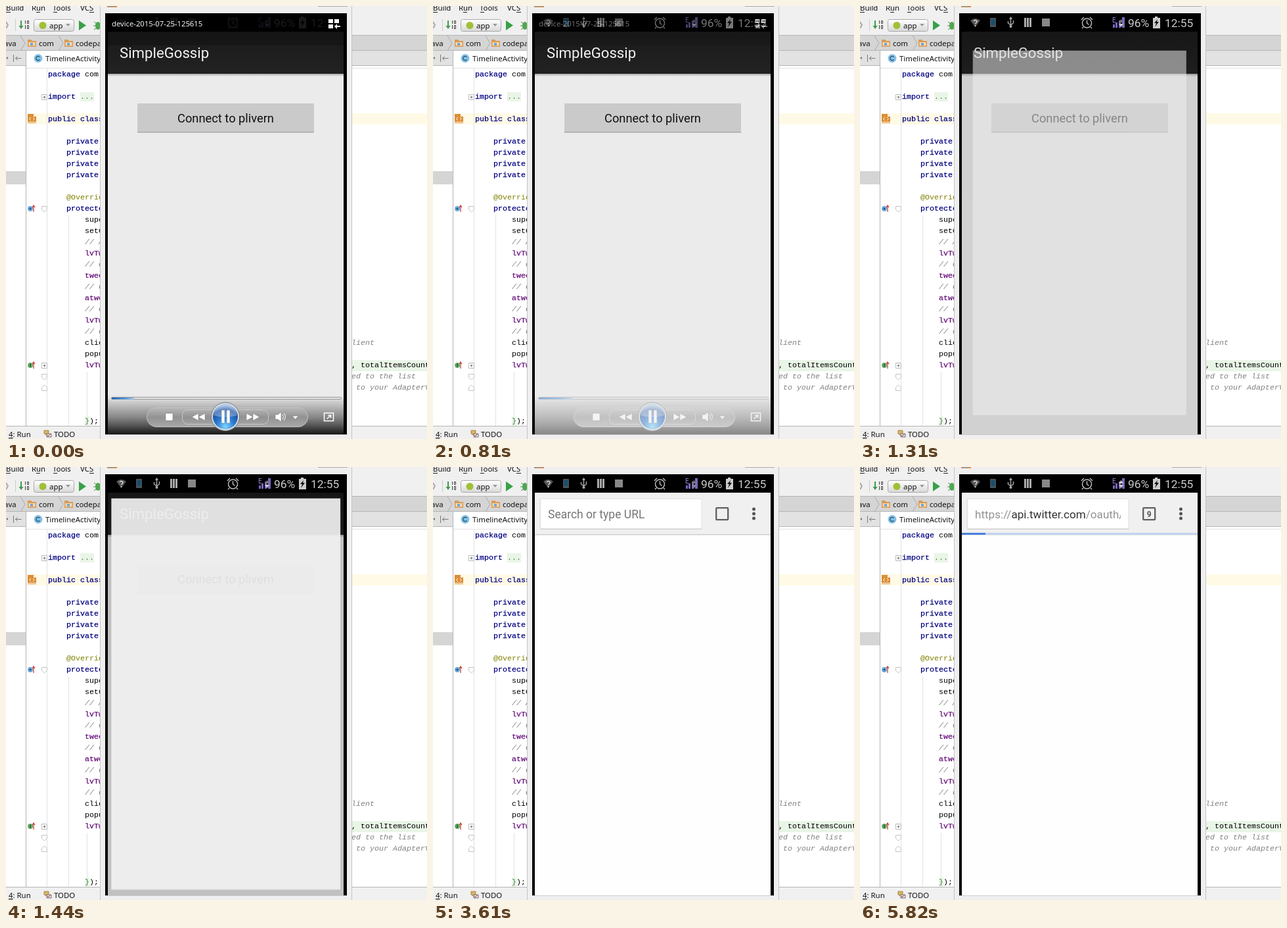
These frames come from a looping animation (641x658 px, 8000 ms). An HTML page:

```html
<!DOCTYPE html>
<html lang="en">
<head>
<meta charset="utf-8">
<title>App sign-in</title>
<style>
html, body { margin: 0; width: 100%; height: 100%; overflow: hidden; background: #fff; }
.stage { position: relative; width: 641px; height: 658px; max-width: 100%; max-height: 100%; overflow: hidden; contain: strict; }
svg, pre { position: absolute; left: 0; top: 0; margin: 0; overflow: hidden; }
svg { width: 641px; height: 658px; }
pre { font: 11.67px/17px "Liberation Mono", monospace; color: #000; }
pre b, pre u { font-weight: normal; text-decoration: none; -webkit-text-stroke: .25px; }
pre b { color: #000080; }
pre u { color: #660e7a; }
pre i { color: #808080; }
pre s { background: #e9f5e6; color: #408040; text-decoration: none; }
.code { left: 64px; top: 96px; width: 80px; }
.tail { left: 526px; top: 504px; width: 115px; }
.ide text { font: 11.4px "Noto Sans", sans-serif; fill: #111; }
.phone text { font-family: Roboto, sans-serif; }
.status text { font-size: 17.4px; fill: #ccc; }

/* Every state change is a hard cut on one shared 8 s clock. */
.player, .seek, .dim, .launch, .bar, .icons, .page, .hint, .url, .up, .down, .sheet, .load, .loaded, .tabs {
  animation: 8s step-end infinite;
}
.player { animation-name: player; }
.seek { animation-name: seek; }
.dim { animation-name: dim; }
.launch { animation-name: launch; transform-origin: 334.5px 345px; }
.bar { animation-name: bar; }
.icons { animation-name: icons; }
.page { animation-name: page; }
.hint { animation-name: hint; }
.url { animation-name: url; }
.up { animation-name: up; }
.down { animation-name: down; }
.sheet { animation-name: sheet; }
.load { animation-name: load; }
.loaded { animation-name: loaded; }
.tabs { animation-name: tabs; }
@keyframes player { 0% { opacity: 1 } 6.5% { opacity: .88 } 8.125% { opacity: .7 } 10.125% { opacity: .47 } 13% { opacity: 0 } }
@keyframes seek { 0% { width: 34px } 3.5% { width: 51px } }
@keyframes dim { 0% { opacity: 0 } 14.75% { opacity: .04 } 16.375% { opacity: .11 } 18% { opacity: .18 } }
@keyframes launch {
  0% { opacity: 0; transform: scale(.8) }
  14.75% { opacity: .14; transform: scale(.83) }
  16.375% { opacity: .53; transform: scale(.905) }
  18% { opacity: .93; transform: scale(.972) }
  19.625% { opacity: 1; transform: none }
}
@keyframes bar { 0% { opacity: 0 } 19.625% { opacity: .11 } 30.75% { opacity: 1 } }
@keyframes icons { 0% { opacity: 0 } 28.5% { opacity: .13 } 30.75% { opacity: 1 } }
@keyframes page { 0% { fill: #f0f0f0 } 30.75% { fill: #fefefe } }
@keyframes hint { 0% { opacity: 1 } 57.625% { opacity: 0 } }
@keyframes url { 0% { opacity: 0 } 57.625% { opacity: 1 } }
@keyframes up { 0% { fill: #777 } 32.625% { fill: #ccc } 45.125% { fill: #777 } 57.625% { fill: #ccc } }
@keyframes down { 0% { fill: #ccc } 32.625% { fill: #888 } 57.625% { fill: #ccc } }
@keyframes sheet { 0% { opacity: 0 } 61.375% { opacity: 1 } 63.25% { opacity: 0 } }
@keyframes load { 0% { opacity: 0 } 67.375% { opacity: 1 } }
@keyframes loaded { 0% { width: 0 } 67.375% { width: 18px } 69.125% { width: 36px } }
@keyframes tabs { 0% { opacity: 0 } 72.75% { opacity: 1 } }
</style>
</head>
<body>
<div class="stage">
<svg class="ide" viewBox="0 0 641 658">
  <defs>
    <linearGradient id="button" x2="0" y2="1"><stop stop-color="#fff"/><stop offset="1" stop-color="#d8d8d8"/></linearGradient>
    <g id="folder"><path d="M0 1h5l2 2h6v9H0z" fill="#d99a56"/><path d="M1.500 5h10v5.500h-10z" fill="#f6d8ac"/><path d="M4 6h4v4H4z" fill="#6da7d6"/></g>
    <path id="chevron" d="M0 0 7 11.500 0 23" fill="none" stroke="#aaa"/>
    <g id="plus" fill="#fff" stroke="#bbb"><path d="M.5.500h8v8h-8z"/><path d="M2.500 4.500h4M4.500 2.500v4" stroke="#777"/></g>
    <path id="fold" d="M.5.500h8v5l-4 3.500-4-3.500z" fill="#fff" stroke="#c4c4c4"/>
    <path id="override" d="M42 313v-10m-2 3 2-3 2 3" fill="none" stroke="#c8453c" stroke-width="1.300"/>
  </defs>
  <path fill="#f0f0f0" d="M0 0h641v45H0zM0 639h641v19H0z"/>
  <path fill="#e2e2e2" d="M0 68h641v22H0z"/>
  <path fill="#d5d5d5" d="M0 45h641v22H0zM0 251h30v20H0z"/>
  <path fill="#fffae6" d="M31 163h610v17H31z"/>
  <path fill="#e9f5e6" d="M527 538h114v17H527z"/>
  <path fill="none" stroke="#b5b5b5" d="M0 44.500h641M0 67.500h641M0 90.500h641M30.500 68v570M0 638.500h641"/>
  <path fill="none" stroke="#e2e2e2" d="M31 94.500h610M62.500 95v543M95.500 318v320M123.500 556v68"/>

  <text y="7">
    <tspan x="0">Build</tspan><tspan x="39">Run</tspan><tspan x="71">Tools</tspan><tspan x="113">VCS</tspan>
  </text>
  <path fill="none" stroke="#222" d="M0 9.500h7M46 9.500h6M72 9.500h6M127 9.500h7"/>

  <path d="m0 24 3 5-3 5" fill="none" stroke="#aaa" stroke-width="2"/>
  <path d="M14.500 20v18" stroke="#ccc"/>
  <path d="M22 22h2v8h2.500L23 35l-3.500-5H22z" fill="#3d9b4b"/>
  <path d="M29 22h1v5h-1zm0 7h1v6h-1z" fill="#444"/>
  <path d="M32.500 22.500h2v4h-2zm0 7h2v5h-2z" fill="none" stroke="#444"/>
  <rect x="42.500" y="20.500" width="61" height="18" rx="3" fill="url(#button)" stroke="#aaa"/>
  <circle cx="56" cy="29.500" r="5.500" fill="#9fc037"/>
  <text x="66" y="34">app</text>
  <path d="M91 27h7l-3.500 4z" fill="#999"/>
  <path d="m111 22 11 7.500-11 7.500z" fill="#37a148"/>
  <ellipse cx="140" cy="30" rx="4" ry="6" fill="#4fa84f"/>
  <path d="m134 24 4 3m-5 3h4m-3 6 4-3" stroke="#4b8a4b"/>

  <text y="61"><tspan x="-3">ava</tspan><tspan x="50">com</tspan><tspan x="106">codepath</tspan></text>
  <use href="#folder" x="33" y="50"/><use href="#folder" x="89" y="50"/>
  <use href="#chevron" x="22" y="45"/><use href="#chevron" x="80" y="45"/>
  <path fill="#fff" d="M31 68h113v26H31z"/>
  <path d="M11.500 74v11m12-5.500h-9m3-3-3 3 3 3" fill="none" stroke="#777"/>
  <path d="m0 79 3-2v4z" fill="#777"/>
  <circle cx="49" cy="79.500" r="6.500" fill="#85c1e5"/>
  <path d="M51.500 77.500a3.200 3.200 0 1 0 0 4" fill="none" stroke="#25506e" stroke-width="1.300"/>
  <text x="60" y="84">TimelineActivity</text>

  <path d="M33 164h9l4 4v10H33z" fill="#dc8e35"/><path d="M42 164v4h4z" fill="#fff"/>
  <path d="m38 169-2.500 2.500L38 174m3-5 2.500 2.500L41 174M33 176.500h13" fill="none" stroke="#fff"/>
  <circle cx="37" cy="308" r="4" fill="#6baade"/><circle cx="37" cy="308" r="1.500" fill="#234e70"/><use href="#override"/>
  <circle cx="37" cy="546" r="4" fill="#67ae6b"/><path d="M37 543.500v5" stroke="#234e2a" stroke-width="1.500"/><use href="#override" y="238"/>
  <use href="#plus" x="54" y="134"/><use href="#plus" x="54" y="542"/>
  <use href="#fold" x="54" y="304"/><use href="#fold" x="54" y="559"/>
  <use href="#fold" transform="matrix(1 0 0 -1 54 585)"/>

  <text y="655"><tspan x="4" text-decoration="underline">4</tspan>: Run<tspan x="73">TODO</tspan></text>
  <path d="M58 645h7v5h-3l-2 2v-2h-2z" fill="#d7b56a" stroke="#a98443"/>
  <path d="M62 650h7v5h-7z" fill="#ddd" stroke="#777"/><path d="m62 652 2 2 4-4" fill="none" stroke="#b33"/>
</svg>

<pre class="code"><b>package</b> com

<b>import</b> <s>...</s>

<b>public class</b>

    <b>private</b>
    <b>private</b>
    <b>private</b>
    <b>private</b>

    <span style="color:#808000">@Override</span>
    <b>protected</b>
        super
        setCo
        <i>// A</i>
        <u>lvTw</u>
        <i>// C</i>
        <u>twee</u>
        <i>// C</i>
        <u>atwe</u>
        <i>// C</i>
        <u>lvTw</u>
        <i>// C</i>
        clie
        popu
        <u>lvTw</u>




        <s>}</s>);</pre>
<pre class="tail"><i>lient</i>

, totalItemsCount
<i>ed to the list</i>
<i> to your AdapterV</i></pre>

<svg class="phone" viewBox="0 0 641 658">
  <defs>
    <linearGradient id="panel" x2="0" y2="1">
      <stop stop-color="#ebebeb" stop-opacity="0"/><stop offset=".13" stop-color="#d8d8d8"/><stop offset=".4" stop-color="#a6a6a6"/>
      <stop offset=".58" stop-color="#858585"/><stop offset=".75" stop-color="#5c5c5c"/><stop offset="1" stop-color="#181818"/>
    </linearGradient>
    <linearGradient id="pill" x2="0" y2="1"><stop stop-color="#b8b8b8"/><stop offset=".5" stop-color="#929292"/><stop offset="1" stop-color="#a8a8a8"/></linearGradient>
    <linearGradient id="action" x2="0" y2="1"><stop stop-color="#1a1a1a"/><stop offset="1" stop-color="#222"/></linearGradient>
    <linearGradient id="shade" x2="0" y2="1"><stop stop-color="#000" stop-opacity=".28"/><stop offset="1" stop-opacity="0"/></linearGradient>
    <linearGradient id="played"><stop stop-color="#1d62b8"/><stop offset=".6" stop-color="#4b96e0"/><stop offset="1" stop-color="#a5cdf1"/></linearGradient>
    <radialGradient id="orb" cy=".9" r=".85"><stop stop-color="#7fd8ff"/><stop offset=".4" stop-color="#2d7fd6"/><stop offset=".8" stop-color="#1c4d9e"/><stop offset="1" stop-color="#8fb4e0"/></radialGradient>
    <clipPath id="screen"><path d="M155 39h359v612H155z"/></clipPath>
    <clipPath id="field"><path d="M165 50h232v42H165z"/></clipPath>
    <path id="skip" d="M0 0v11l10-5.500zM10 0v11l10-5.500z"/>
  </defs>

  <path fill="#efefef" d="M143 0h384v658H143z"/>
  <path stroke="#c4c4c4" d="M143.500 0v658M526.500 0v658"/>
  <path fill="#e08a43" d="M154 0h15v2h-15z"/><path fill="#5aaee0" d="M155 0h10v1h-10z"/>
  <path fill="#aaa" d="M475 0h45v1h-45z"/>
  <path d="M151 11h368v640H151z"/>
  <path stroke="#ccc" d="M151 651.500h368"/>

  <g class="status">
    <path d="M168 22q7.500-6 15 0l-7.500 10z" fill="#555"/>
    <path d="M173 23q2.500-3 5 0 0 2-2.500 4m0 2v2" fill="none" stroke="#ddd" stroke-width="1.500"/>
    <rect x="198" y="18" width="9" height="14" rx="1" fill="#4b5358"/><path d="M199.500 20h6v9h-6z" fill="#174e70"/>
    <path d="M229.500 18v14m-4-9v3l4 3 4-3v-4" fill="none" stroke="#aaa" stroke-width="1.400"/><path d="m227 20 2.500-4 2.500 4z" fill="#aaa"/><circle cx="229.500" cy="31" r="2" fill="#aaa"/>
    <path d="M250 18h3v14h-3zm4 0h3v14h-3zm4 0h3v14h-3z" fill="#aaa"/>
    <path d="M277 19h12v12h-12z" fill="#888"/>
    <g fill="none" stroke="#bbb" stroke-width="1.500"><circle cx="345.500" cy="26" r="7"/><path d="M345.500 21.500V26l3 2.500M337 21l4-4m9 0 4 4m-14 11-2 2m13-2 2 2"/></g>
    <text x="384" y="25" style="font-size:10px;fill:#9a82dd">E</text>
    <path d="M385 33v-5h3v5zm4 0v-8h3v8zm5 0V22h3v11zm5 0V17h4v16z" fill="#7b68bd"/>
    <path class="up" d="m394 25 3.500-5 3.500 5z"/><path class="down" d="m394 27 3.500 5 3.500-5z"/>
    <text x="408" y="32">96%</text>
    <path d="M446 18h3v-2h4v2h4v16h-11z" fill="#ccc"/><path d="m453 20-5 6h3l-2 6 6-8h-3z" fill="#111"/>
    <text x="464" y="32">12:55</text>
  </g>

  <g clip-path="url(#screen)">
    <path fill="#ebebeb" d="M155 39h359v612H155z"/>
    <path fill="url(#action)" d="M155 39h359v64H155z"/>
    <path fill="url(#shade)" d="M155 103h359v4H155z"/>
    <text x="173" y="79" font-size="22.200" fill="#f3f3f3">SimpleGossip</text>
    <path fill="#cacaca" d="M200 148h269v44H200z"/><path fill="#a8a8a8" d="M200 191h269v1.500H200z"/>
    <text x="334.500" y="177" font-size="18.300" text-anchor="middle" fill="#111">Connect to plivern</text>
    <path class="dim" d="M155 39h359v612H155z"/>

    <g class="launch">
      <path class="page" d="M155 39h359v612H155z"/>
      <path fill="#f0f0f0" d="M155 39h359v63H155z"/>
      <g class="sheet">
        <path fill="#f2f2f2" d="M155 103h359v547H155z"/><path fill="#e7e7e7" d="M157 103h354v542H157z"/><path fill="#fefefe" d="M155 103h355v540H155z"/>
      </g>
      <g class="bar">
        <path fill="#cfcfcf" d="M155 102h359v1.500H155z"/>
        <rect x="162.500" y="48" width="247" height="47" rx="2" fill="#dedede"/><path d="M164 94h245" stroke="#c2c2c2"/>
        <rect x="164" y="49" width="244.500" height="44.500" rx="1" fill="#fff"/>
        <text class="hint" x="175" y="78" font-size="17.500" fill="#777">Search or type URL</text>
        <g clip-path="url(#field)"><text class="url" x="175" y="78" font-size="17.100" fill="#929292">https://<tspan fill="#333">api.twitter.com</tspan>/oauth/auth</text></g>
      </g>
      <g class="icons">
        <rect x="431.200" y="62.200" width="18" height="18" rx="1" fill="none" stroke="#606060" stroke-width="2.300"/>
        <g fill="#555"><circle cx="488.500" cy="64" r="2.500"/><circle cx="488.500" cy="71" r="2.500"/><circle cx="488.500" cy="78" r="2.500"/></g>
        <text class="tabs" x="440.200" y="75.500" font-size="12" font-weight="700" text-anchor="middle" fill="#555">9</text>
      </g>
      <g class="load"><path fill="#c1d3ef" d="M155 100h359v3H155z"/><rect class="loaded" x="155" y="100" height="3" fill="#4783dc"/></g>
    </g>
  </g>

  <g class="player">
    <path d="M155 11h359v28H155z" opacity=".88"/>
    <path d="M155 39h359v21H155z" opacity=".2"/>
    <text x="161" y="31" style="font:11.300px 'Open Sans',sans-serif" fill="#fff">device-2015-07-25-125615</text>
    <path d="M491 20h7v6h-7zm9 0h7v6h-7zm-9 8h7v6h-7zm9 3 4-4v3h5v2h-5v3z" fill="#fff"/>
    <path fill="url(#panel)" d="M155 590h359v61H155z"/>
    <rect x="160.500" y="594.500" width="350" height="3" rx="1.500" fill="#e6e6e6" stroke="#999"/>
    <rect class="seek" x="161" y="595" height="2.500" fill="url(#played)"/>
    <rect x="214.500" y="610.500" width="245" height="29" rx="14.500" fill="url(#pill)" stroke="#c2c2c2"/>
    <rect x="268.500" y="613.500" width="131" height="22" rx="8" fill="none" stroke="#c8c8c8"/>
    <g fill="#fff" stroke="#777" stroke-width=".5">
      <path d="M243 619h11v11h-11z"/>
      <use href="#skip" x="366" y="619"/><use href="#skip" transform="matrix(-1 0 0 1 303 619)"/>
      <path d="M410 621h4l5-4v15l-5-4h-4zM436 623h9l-4.500 5z"/>
    </g>
    <path d="M421 621q3 3.500 0 7m2-9q5 5.500 0 11" fill="none" stroke="#fff"/>
    <circle cx="334" cy="624" r="21.500" fill="#d5dce4" stroke="#777"/>
    <circle cx="334" cy="624" r="19" fill="url(#orb)"/>
    <path d="M316 622a18 17 0 0 1 36 0q-18 6-36 0" fill="#fff" opacity=".3"/>
    <path d="M328 614h5v20h-5zm8 0h5v20h-5z" fill="#fff" stroke="#6e87ac" stroke-width=".7"/>
    <path d="M484.500 618.500h14v12h-14zm4 9 6-5.500m-4 0h4v4" fill="none" stroke="#fff" stroke-width="1.500"/>
  </g>
</svg>
</div>
</body>
</html>
```
